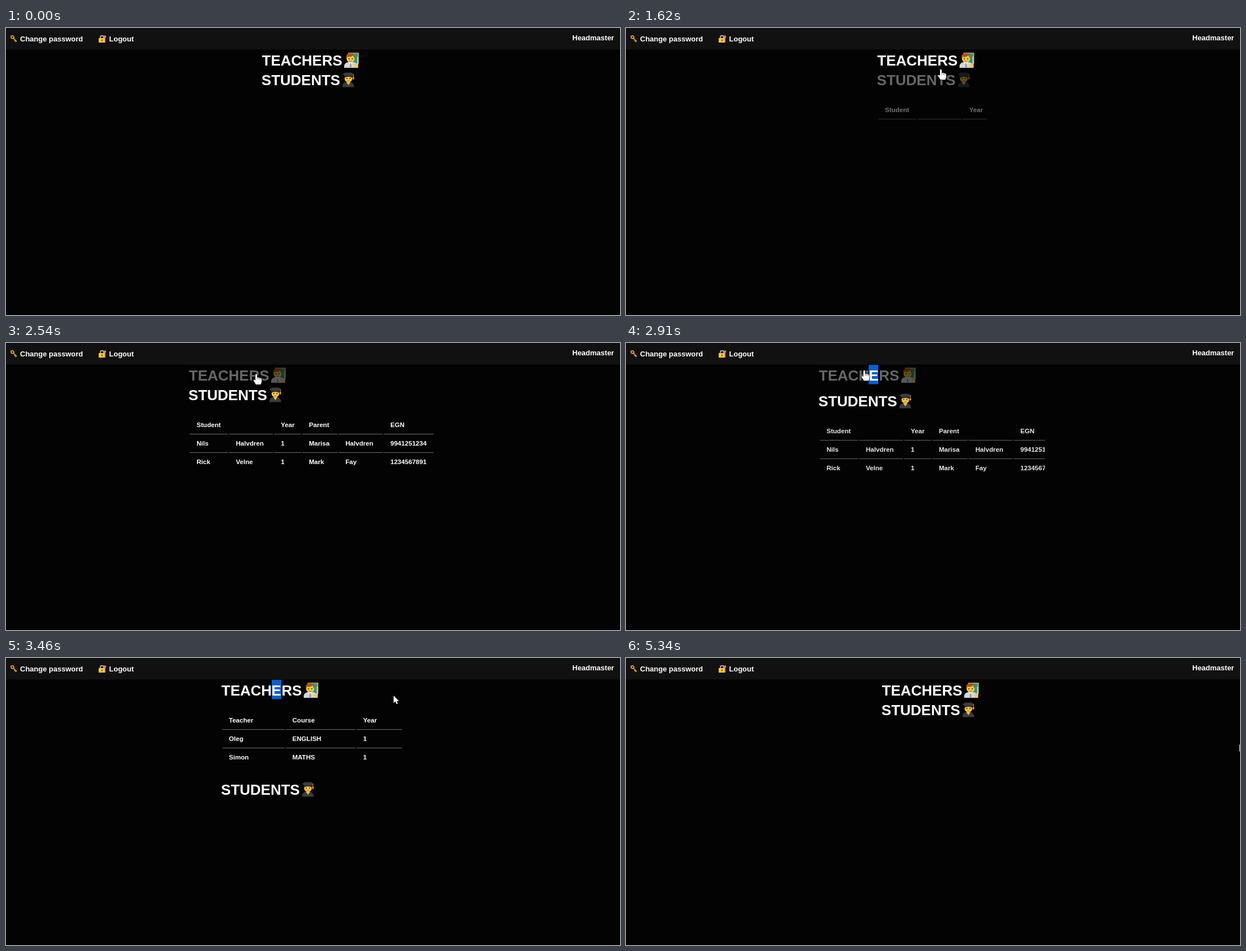
Recreate the animation shown at these times as an HTML page with a canvas. Size 1093 px wide and 512 px high, loop 6.11 s.

```html
<!DOCTYPE html>
<html lang="en">
<head>
<meta charset="utf-8">
<title>School dashboard</title>
<style>
  html, body { margin: 0; width: 100%; height: 100%; overflow: hidden; background: #030303; }
  canvas { display: block; }
</style>
</head>
<body>
<canvas id="stage" width="1093" height="512"></canvas>
<script>
const ctx = document.getElementById('stage').getContext('2d');
const LOOP = 6110, BG = '#030303';
const CENTER = 544.5, LINE = 34.5, TOP = 39, BASE_WIDTH = 178, LINK_WIDTH = 172, PANEL_HEIGHT = 142.5;

const teachers = {
  title: 'TEACHERS', shift: 0, width: 322, icon: teacherIcon,
  cols: [[1, 112], [114, 238], [240, 320.5]],
  rows: [['Teacher', 'Course', 'Year'], ['Oleg', 'ENGLISH', '1'], ['Simon', 'MATHS', '1']]
};
const students = {
  title: 'STUDENTS', shift: -0.7, width: 438, icon: studentIcon,
  cols: [[1.5, 69.5], [71.5, 149.5], [151.5, 199.5], [201.5, 264.5], [266.5, 344.5], [346.5, 435.5]],
  rows: [
    ['Student', '', 'Year', 'Parent', '', 'EGN'],
    ['Nils', 'Halvdren', '1', 'Marisa', 'Halvdren', '9941251234'],
    ['Rick', 'Velne', '1', 'Mark', 'Fay', '1234567891']
  ]
};

// The screen refreshes in bursts: [first, last, number of refreshes].
const bursts = [
  [0, 0, 1], [540, 1150, 9], [1230, 1300, 2], [1530, 2080, 8], [2150, 2760, 9], [2850, 3460, 9],
  [3600, 3600, 1], [3840, 4160, 5], [4310, 4870, 8], [4950, 4950, 1], [5340, 5340, 1]
];
// Pointer path: [time, x, y].
const path = [
  [540, 795, 436], [692, 712, 280], [845, 630, 155], [997, 578, 80], [1150, 557, 76], [1300, 553, 74],
  [1530, 553, 74], [1760, 575, 74], [1923, 593, 74], [2080, 634, 60], [2150, 628, 60], [2500, 450, 57],
  [2684, 424, 49], [2926, 424, 49], [3384, 690, 67], [3460, 690, 67], [3600, 690, 68], [3760, 690, 68],
  [4160, 540, 62], [4310, 545, 62], [4470, 588.5, 64], [4550, 660, 80], [4630, 790, 110], [4790, 1073, 160],
  [4870, 1120, 165], [5339, 1120, 165], [5340, 1092, 154]
];

function refreshTime(t) {
  const [start, end, count] = bursts.filter(b => t >= b[0]).pop();
  const step = (end - start) / (count - 1 || 1);
  return start + step * Math.min(count - 1, Math.floor((t - start + 20) / step));
}

function swing(t, start) {
  const u = Math.max(0, Math.min(1, (t - start) / 600));
  return 0.5 - Math.cos(Math.PI * u) / 2;
}

function pointerAt(t) {
  const i = path.findIndex(p => p[0] > t);
  if (i === 0) return { x: 1200, y: 600 };
  if (i < 0) return { x: 1092, y: 154 };
  const [t0, x0, y0] = path[i - 1], [t1, x1, y1] = path[i], u = (t - t0) / (t1 - t0);
  return { x: x0 + (x1 - x0) * u, y: y0 + (y1 - y0) * u };
}

function text(str, x, y, size, color = '#fff') {
  ctx.font = `bold ${size}px "Liberation Sans", Arial, sans-serif`;
  ctx.fillStyle = color;
  ctx.fillText(str, x, y);
}
function rect(x, y, w, h, color) {
  ctx.fillStyle = color;
  ctx.fillRect(x, y, w, h);
}
function shape(d, fill, stroke, width = 1) {
  const p = new Path2D(d);
  if (stroke) { ctx.strokeStyle = stroke; ctx.lineWidth = width; ctx.stroke(p); }
  if (fill) { ctx.fillStyle = fill; ctx.fill(p); }
}
function disc(x, y, r, color) {
  ctx.fillStyle = color;
  ctx.beginPath();
  ctx.arc(x, y, r, 0, 7);
  ctx.fill();
}
function at(x, y, draw, scale = 1) {
  ctx.save();
  ctx.translate(x, y);
  ctx.scale(scale, scale);
  draw();
  ctx.restore();
}

function teacherIcon() {
  at(146.5, 5, () => {
    rect(7, 0, 19, 20, '#e79a32');
    rect(8, 1.5, 16, 18, '#0f9fa5');
    shape('M0 27V23Q1 18 7 17H17Q24 18 25 27Z', '#d6d6d6');
    shape('M8 17H15L11.5 24Z', '#f7f7f7');
    shape('M10.5 19H12.5L13 26H10Z', '#8d9399');
    disc(11.5, 10.5, 7.3, '#ffc83d');
    shape('M4 11Q2 1 11 1Q20 1 19 11Q17 8 16 5Q11 9 6 7Q5 9 4 11Z', '#a4571f');
    rect(7.5, 10, 2, 2, '#40352a');
    rect(13.5, 10, 2, 2, '#40352a');
    shape('M9 14.5Q11.5 17 14 14.5', null, '#8a5a15');
    shape('M18 22Q20 18 25 20V26H19Z', '#ffc83d');
    shape('M23.8 7V21', null, '#f3e6c8', 1.2);
  });
}
function studentIcon() {
  at(143.5, 5.5, () => {
    shape('M0 26V23Q1 18 7 17H14Q20 18 21 26Z', '#3b3b3b');
    shape('M6.5 17H14.5L10.5 22Z', '#ffc83d');
    shape('M9 20H12L10.5 23Z', '#e8a31c');
    disc(10.5, 10.5, 6.8, '#ffc83d');
    shape('M3.5 4H17.5V9Q10.5 6 3.5 9Z', '#292929');
    shape('M0 3L5 0H16L21 3L17 6H4Z', '#3d3d3d');
    rect(6.8, 9.5, 2, 2, '#40352a');
    rect(12.3, 9.5, 2, 2, '#40352a');
    shape('M8.5 14Q10.5 15.5 12.5 14', null, '#8a5a15');
    rect(18.8, 3, 1.2, 6, '#d98a1f');
    rect(18, 8, 2.6, 4, '#f2a52b');
  });
}

function navBar() {
  rect(0, 0, 1093, 38.5, '#111');
  text('Change password', 25, 24, 13);
  text('Logout', 183.5, 24, 13);
  text('Headmaster', 1008, 22, 13);
  shape('M13 18L19 24M16.5 21.5L14.8 23M18.3 23.3L16.8 24.8', null, '#eda72c', 1.7);
  shape('M9 14.5L12 13.7L14.3 16.5L12.5 18.8L9.5 18Z', null, '#eda72c', 1.8);
  shape('M168 19V16Q168 13.6 171 13.6Q174 13.6 174 16V19', null, '#b9bcc0', 1.7);
  rect(165, 18, 11.5, 8, '#ffc83d');
  rect(170, 20.5, 1.8, 3, '#5a431b');
  shape('M176 17V25', null, '#e8912d', 1.6);
  disc(176, 15.5, 2.2, '#e8912d');
}

function heading(section, left, top, hovered) {
  const y = Math.round(top);
  text(section.title, left + section.shift, y + 28, 26);
  at(left, y, section.icon);
  if (hovered) rect(left - 2, y + 2, LINK_WIDTH + 4, 32, 'rgba(3,3,3,.6)');
}

function selectedLetter(left) {
  ctx.font = 'bold 26px "Liberation Sans", Arial, sans-serif';
  const x = left + ctx.measureText('TEACH').width - 0.5;
  rect(Math.round(x), TOP, 17, LINE, '#0560cf');
  text('E', x, TOP + 28, 26);
}

function panel(section, left, top, open) {
  if (open <= 0.001) return;
  ctx.save();
  ctx.beginPath();
  ctx.rect(left, top, section.width * open, PANEL_HEIGHT * open);
  ctx.clip();
  ctx.globalAlpha = open;
  section.rows.forEach((row, r) => section.cols.forEach(([from, to], c) => {
    const y = top + r * 33;
    text(row[c], left + from + 12.2, Math.round(y + 41.6), 11.6);
    if (r < 2) rect(Math.round(left + from), Math.round(y + 53.7), Math.round(to - from), 1, '#707070');
  }));
  ctx.restore();
}

function arrow() {
  shape('M0 0V16L3.7 12.6L6.3 18.4L9 17.2L6.5 11.6H11.4Z', '#fff', '#000', 1.5);
}
function hand() {
  shape('M-1.6 1Q-1.5 -.3 0 -.3Q1.5 -.3 1.5 1V6Q4 5 4.6 6.7Q7 6 7.4 7.6Q9.3 7.2 9.5 9V13Q9 15 8 18.3H-.8' +
    'Q-2 15.5 -4.4 12.5Q-5.4 10.5 -4.4 9.8Q-3 9.4 -1.6 11.3Z', '#fff', '#000', 1.5);
  shape('M1.7 6V9.5M4.7 7V10M7.3 8V10.5', null, '#333', .7);
}
function beam() {
  shape('M-2.5 -6H2.5M-2.5 6H2.5M0 -6V6', null, '#ddd', 1);
}

function draw(t) {
  const teachersOpen = swing(t, 2816) - swing(t, 4296);
  const studentsOpen = swing(t, 1330) - swing(t, 2816);
  const left = CENTER - Math.max(BASE_WIDTH, teachers.width * teachersOpen, students.width * studentsOpen) / 2;
  const studentsTop = TOP + LINE + PANEL_HEIGHT * teachersOpen;
  const { x, y } = pointerAt(t);
  const over = (top, width) => x >= left && x <= left + width && y >= top && y < top + LINE;
  const overLink = top => over(top, LINK_WIDTH);
  const overText = top => over(top, BASE_WIDTH);
  const tops = [TOP, studentsTop];

  rect(0, 0, 1093, 512, BG);
  navBar();
  heading(teachers, left, TOP, overLink(TOP));
  panel(teachers, left, TOP + LINE, teachersOpen);
  heading(students, left, studentsTop, overLink(studentsTop));
  panel(students, left, studentsTop + LINE, studentsOpen);
  if (t >= 2680 && t < 4300) selectedLetter(left);

  if (tops.some(overLink)) at(x, y, hand);
  else if (tops.some(overText)) at(x, y, beam);
  else at(x, y, arrow, 0.83);
}

function tick() {
  draw(refreshTime(performance.now() % LOOP));
  requestAnimationFrame(tick);
}
tick();
</script>
</body>
</html>
```
